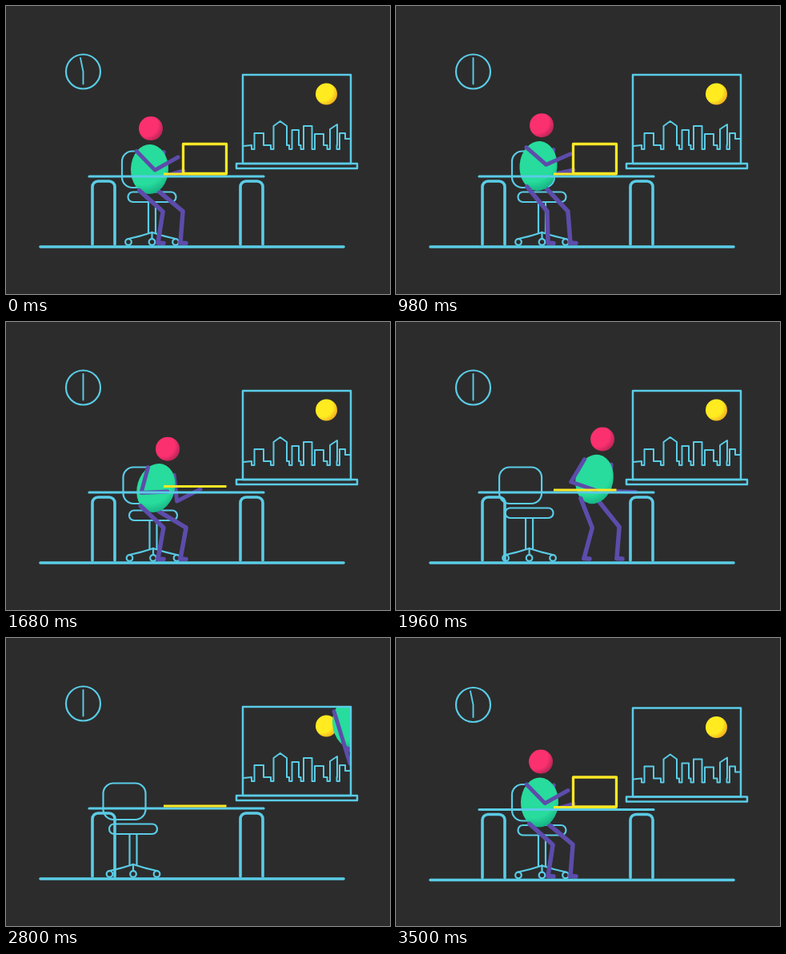
An HTML page with a canvas for the animation above (3.57 s loop, 480 by 360 pixels).

```html
<!DOCTYPE html>
<html lang="en">
<head>
<meta charset="utf-8">
<title>Leaving at six</title>
<style>
html, body { margin: 0; width: 100%; height: 100%; overflow: hidden; background: #2c2c2c; }
canvas { display: block; width: 480px; height: 360px; }
</style>
</head>
<body>
<canvas id="stage" width="480" height="360"></canvas>
<script>
const ctx = document.getElementById('stage').getContext('2d');
const LOOP = 3570, STEP = 70, SLIDE_START = 2880;
const CYAN = '#5accE6', YELLOW = '#fbe826', PURPLE = '#5d4cab', BACK = '#2c2c2c';
const ARM = 33, LEG = 39.5, NECK = 51;

const smooth = u => u * u * (3 - 2 * u);
const inOutCubic = u => u < .5 ? 4 * u ** 3 : 1 - 4 * (1 - u) ** 3;

// Blend numbers, or lists of them
const mix = (a, b, u) => Array.isArray(a) ? a.map((v, i) => mix(v, b[i], u)) : a + (b - a) * u;

// Value at time t of a track of [time, value] keys
function track(keys, t) {
  const next = keys.findIndex(key => t < key[0]);
  if (next === 0) return keys[0][1];
  if (next < 0) return keys[keys.length - 1][1];
  const [t0, a] = keys[next - 1], [t1, b] = keys[next];
  return mix(a, b, smooth((t - t0) / (t1 - t0)));
}

// A pose: [x, y, lean] of the body, then near and far [hand x, y], near and far [foot x, y].
// Elbows and knees follow from the limb lengths.
const seated = [[190, 296], [218, 296]];
const typing = [[179.5, 204, .03], [215, 189], [222, 206], ...seated];
const leaning = [[180, 205.5, .12], [217, 185], [222, 207], ...seated];
const looking = [[178, 200, .08], [218, 185], [222, 205], ...seated];
const closing = [[187.5, 207.5, .29], [202, 212], [243, 209], ...seated];
const standing = [[308.5, 203.5, .11], [298, 209], [356, 216], [280, 295], [334, 295]];
const leaping = [[365, 140, .3], [357, 152], [402, 121], [350, 192], [385, 190]];
const flying = [[432, 109, -.25], [430, 157], [470, 60], [455, 200], [475, 195]];

const poses = [[0, typing], [420, leaning], [840, looking], [1330, looking], [1610, closing],
  [1680, closing], [2240, standing], [2500, leaping], [2800, flying]];

function poseAt(t) {
  const [body, nearHand, farHand, nearFoot, farFoot] = track(poses, t);
  const tap = t < 1100 ? 3 * Math.sin(t * Math.PI / 70) : 0;
  const run = Math.max(0, Math.min(1, (t - 1680) / 560));
  const hop = 9 * Math.sin(run * Math.PI), stride = 16 * Math.sin(run * Math.PI * 4);
  return [
    [body[0], body[1] - hop, body[2]],
    [nearHand[0], nearHand[1] + tap], [farHand[0], farHand[1] - tap],
    [nearFoot[0] + stride, nearFoot[1]], [farFoot[0] - stride, farFoot[1]]
  ];
}

function stroke(color, width) {
  ctx.strokeStyle = color;
  ctx.lineWidth = width;
  ctx.stroke();
}

function line(points, color, width) {
  ctx.beginPath();
  for (const [x, y] of points) ctx.lineTo(x, y);
  stroke(color, width);
}

function box(x, y, w, h, r, color, width) {
  ctx.beginPath();
  ctx.roundRect(x, y, w, h, r);
  stroke(color, width);
}

function circle(x, y, r, color, width) {
  ctx.beginPath();
  ctx.arc(x, y, r, 0, 7);
  stroke(color, width);
}

// Oval with a shadow along its lower right edge
function oval(x, y, rx, ry, tilt, main, dark) {
  const cx = x - rx * .35, cy = y - ry * .3;
  const g = ctx.createRadialGradient(cx, cy, 0, cx, cy, ry * 1.5);
  g.addColorStop(.62, main);
  g.addColorStop(.92, dark);
  ctx.fillStyle = g;
  ctx.beginPath();
  ctx.ellipse(x, y, rx, ry, tilt, 0, 7);
  ctx.fill();
}

// Two equal bones from a joint to its end; side picks the way it bends
function limb([x, y], end, bone, side, width) {
  const dx = end[0] - x, dy = end[1] - y, reach = Math.hypot(dx, dy) || 1;
  const bend = side * Math.sqrt(Math.max(0, bone * bone - reach * reach / 4)) / reach;
  line([[x, y], [x + dx / 2 - dy * bend, y + dy / 2 + dx * bend], end], PURPLE, width);
}

function leg(hip, foot) {
  limb(hip, foot, LEG, -1, 5.5);
  line([foot, [foot[0] + 7, foot[1] + .5]], PURPLE, 5.5);
}

function person([[x, y, lean], nearHand, farHand, nearFoot, farFoot]) {
  const cos = Math.cos(lean), sin = Math.sin(lean);
  const joint = (u, v) => [x + u * cos - v * sin, y + u * sin + v * cos];
  leg(joint(12, 27), farFoot);
  limb(joint(17, -22), farHand, ARM, 1, 5);
  oval(x, y, 23.5, 31, lean, '#27dc9c', '#14ac80');
  leg(joint(-12, 27), nearFoot);
  limb(joint(-17, -22), nearHand, ARM, 1, 5);
  oval(...joint(0, -NECK), 15, 15, 0, '#fb306f', '#c0265a');
}

function clock(t) {
  const tip = track([[700, 93], [840, 96.5]], t);
  circle(96.5, 82, 21.5, CYAN, 2.2);
  line([[tip, 65], [96.5, 82], [96.5, 97.5]], CYAN, 1.9);
}

// Buildings: left, width, top and, for a raised roof, where its peak sits
const buildings = [[310.5, 11.5, 159], [334.5, 16.5, 150, .5], [357.5, 8.5, 155], [372, 10.5, 150],
  [386, 11, 160], [405, 9, 154, 1], [417, 7, 159]];

function view() {
  oval(400.5, 110, 13.5, 13.5, 0, '#ffeb20', '#f3b41f');
  const outline = [[297, 175]];
  for (const [x, w, top, peak] of buildings) {
    outline.push([x - 3.5, 174], [x - 3.5, 179], [x, 179], [x, top]);
    if (peak) outline.push([x + w * peak, top - 6]);
    outline.push([x + w, top], [x + w, 174]);
  }
  outline.splice(-1, 1, [424, 166], [430, 166]);
  line(outline, CYAN, 2);
}

function windowFrame() {
  box(296, 86, 135, 111, 0, CYAN, 2.5);
  box(288, 197, 151, 6, 0, CYAN, 2.5);
}

function chair(t) {
  const x = track([[1330, 0], [1610, 1.5], [1680, 1.5], [2100, -22], [2240, -22], [2800, -23.5]], t);
  const sink = track([[1330, 0], [1610, 3], [1680, 3], [1960, 0]], t);
  ctx.save();
  ctx.translate(x, 0);
  box(145, 181.5, 53, 45.5, 13, CYAN, 2.2);
  box(152.5, 232.5 + sink, 60, 12.5, 6.2, CYAN, 2.2);
  for (const post of [178, 187]) line([[post, 245 + sink], [post, 284]], CYAN, 2.2);
  for (const wheel of [153, 182.5, 212]) {
    ctx.beginPath();
    ctx.moveTo(182.5, 283);
    ctx.quadraticCurveTo((wheel + 182.5) / 2, 288, wheel, 291);
    stroke(CYAN, 2.2);
    circle(wheel, 295, 3.8, CYAN, 2.2);
  }
  ctx.restore();
}

function desk() {
  line([[104, 213], [322, 213]], CYAN, 3.2);
  for (const x of [108, 293]) {
    ctx.beginPath();
    ctx.moveTo(x, 298);
    ctx.arcTo(x, 219, x + 14, 219, 7);
    ctx.arcTo(x + 28, 219, x + 28, 298, 7);
    ctx.lineTo(x + 28, 298);
    stroke(CYAN, 3.6);
  }
}

function laptop(t) {
  const shut = track([[1450, 0], [1650, 1]], t);
  const y = track([[1540, 210], [1650, 205.5], [1680, 205.5], [1780, 210]], t);
  const left = mix(221.5, 198, shut), height = 37 * (1 - shut);
  ctx.lineCap = 'butt';
  line([[197, y], [275.5, y]], YELLOW, 3);
  if (height > .5) box(left, y - .5 - height, 275.5 - left, height, 0, YELLOW, 3.3);
  ctx.lineCap = 'round';
}

function scene(t, y) {
  const outside = t >= 2500, drift = Math.max(0, t - 2800);
  ctx.save();
  ctx.translate(0, y);
  clock(t);
  view();
  if (outside) {
    ctx.save();
    ctx.beginPath();
    ctx.rect(296, 86, 135, 111);
    ctx.clip();
    ctx.translate(drift * .3, -drift * .15);
    person(poseAt(t));
    ctx.restore();
  }
  windowFrame();
  chair(t);
  if (!outside) person(poseAt(t));
  desk();
  laptop(t);
  line([[43, 301], [422, 301]], CYAN, 3.6);
  ctx.restore();
}

function draw(now) {
  const t = Math.floor(now % LOOP / STEP) * STEP;
  ctx.fillStyle = BACK;
  ctx.fillRect(0, 0, 480, 360);
  ctx.lineCap = ctx.lineJoin = 'round';
  if (t < SLIDE_START) {
    scene(t, 0);
  } else {
    const y = 360 * inOutCubic((t - SLIDE_START) / (LOOP - SLIDE_START));
    scene(t, -y);
    scene(0, 360 - y);
  }
}

const start = performance.now();
function tick() {
  draw(performance.now() - start);
  requestAnimationFrame(tick);
}
tick();
</script>
</body>
</html>
```
